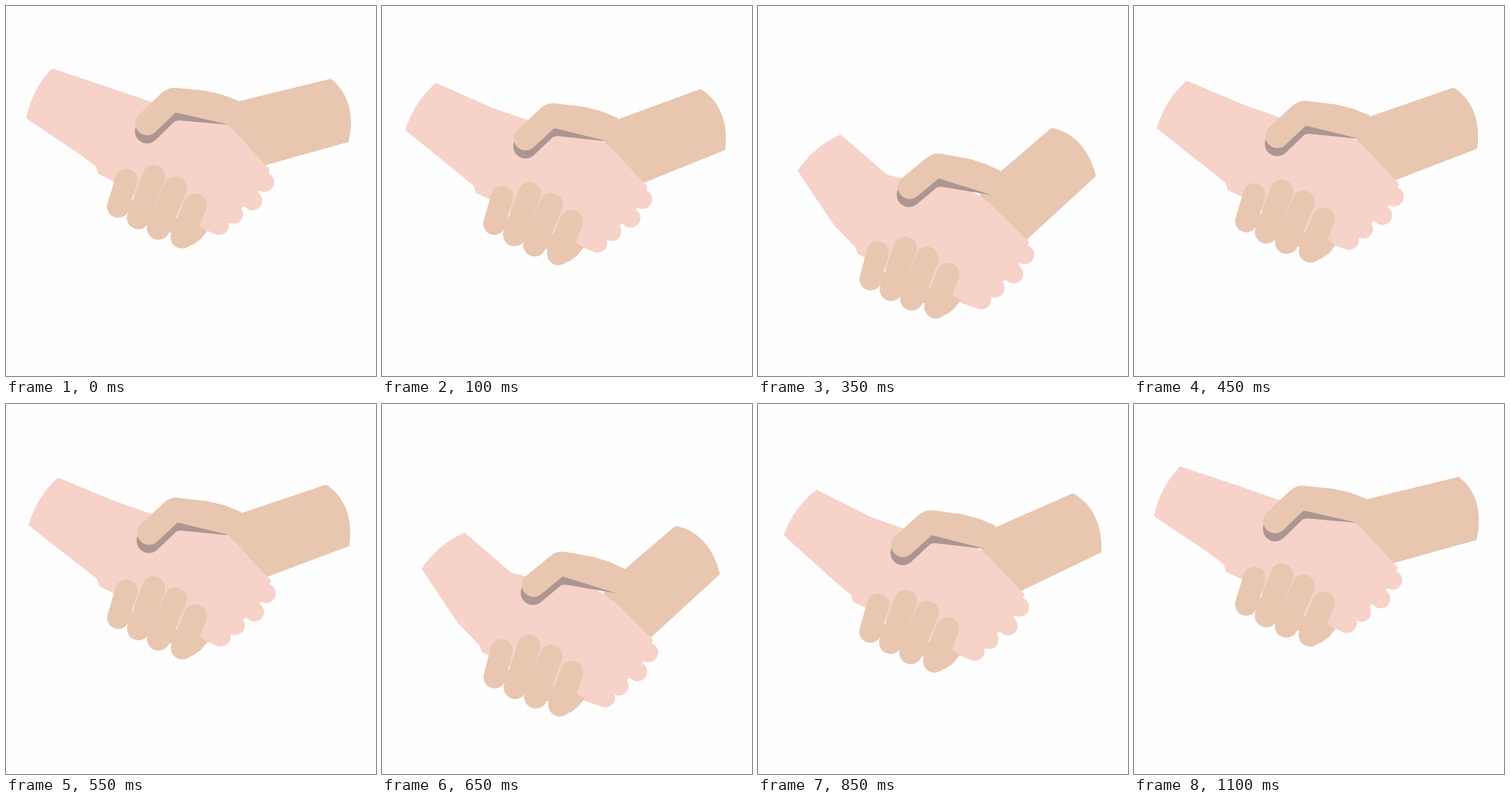
Write an HTML page that moves like this. It is 498 px wide and 498 px high and loops after 2.55 s.

```html
<!DOCTYPE html>
<html lang="en">
<head>
<meta charset="utf-8">
<title>Handshake</title>
<style>
  html, body { margin: 0; width: 100%; height: 100%; overflow: hidden; background: #fefefe; }
  svg { display: block; width: 100%; height: 100%; }
  path { stroke-linecap: round; }
</style>
</head>
<body>
<svg viewBox="0 0 498 498"></svg>
<script>
const LOOP = 2550, STEP = 50;
const PINK = '#f6d2c9', TAN = '#e8c6b0', SHADE = '#ad9691';

// Rigid parts: pivot, then travel and turn (degrees) for one unit of lowering.
const parts = {
  l: { x: 160, y: 180, dx: 5.3, dy: 118.9, turn: 22.3 },  // left forearm
  r: { x: 335, y: 170, dx: 1.6, dy: 104.3, turn: -26.9 }, // right forearm
  p: { x: 240, y: 240, dx: 11, dy: 102.5, turn: -2.75 },  // pink hand
  f: { x: 200, y: 270, dx: 0.6, dy: 95.5, turn: -2.4 },   // tan fingers
  t: { x: 240, y: 150, dx: 14.5, dy: 89.5, turn: 4.6 }    // tan thumb
};

// Every point is written as part letter + x,y in the raised pose.
// A width makes the shape a stroked line with round ends.
const shapes = [
  { color: TAN, d: 'Mr437,98 Cr456,112 r471,140 r461,183 Lr325,221 r296,165 r314,128Z' },
  { color: PINK, d: 'Ml62,84 Ll140,110 p195,129 p270,142 p292,156 p306,167 p355,220 p348,237 ' +
      'p332,262 p306,280 p287,295 p284,308 p262,299 p231,285 p205,268 p172,255 p150,238 ' +
      'p145,236 p124,226 p121,216 l100,200 l64,176 l27,151 Ql35,112 l62,84Z' },
  { color: PINK, width: 26, d: 'Mp348,237h0 Mp332,262h0 Mp306,280h0 Mp287,295h0' },
  { color: TAN, d: 'Mf151,270 Lf172,260 f205,272 f231,286 f258,295 f271,303 f262,314 ' +
      'f252,321 f237,326 f237,311 f205,299 f178,285Z' },
  { color: TAN, width: 30, d: 'Mf162,234 Lf151,270' },
  { color: TAN, width: 31, d: 'Mf199,230 Lf178,285 Mf228,245 Lf205,299 Mf255,268 Lf237,311' },
  { color: SHADE, width: 33, d: 'Mt190,168.5 Lt219,140' },
  { color: SHADE, d: 'Mt226,140 Lt302,160 t233,154 t222,156Z' },
  { color: TAN, width: 32, d: 'Mt190,158 Lt218,131' },
  { color: TAN, d: 'Mt207,119.5 Qt217,109 t228,110 Lt268,114 t290,119 t314,128 t302,160 t231,144 t210,140Z' }
];

// Time, shakes completed, shakes per ms.
const phaseKeys = [
  [0, 0, .0014], [200, .319, .00175], [350, .613, .0023], [550, 1.131, .0027],
  [650, 1.387, .0024], [850, 1.806, .0016], [1100, 2, 0]
];

function phaseAt(time) {
  const next = phaseKeys.findIndex(key => key[0] > time);
  if (next < 0) return 2;
  const [t0, a, slopeA] = phaseKeys[next - 1], [t1, b, slopeB] = phaseKeys[next];
  const span = t1 - t0, s = (time - t0) / span, q = 1 - s;
  return q * q * (1 + 2 * s) * a + s * s * (3 - 2 * s) * b
    + span * s * q * (q * slopeA - s * slopeB);
}

function place(part, x, y, lowered) {
  const angle = part.turn * lowered * Math.PI / 180;
  const cos = Math.cos(angle), sin = Math.sin(angle);
  const rx = x - part.x, ry = y - part.y;
  const px = part.x + part.dx * lowered + rx * cos - ry * sin;
  const py = part.y + part.dy * lowered + rx * sin + ry * cos;
  return `${px.toFixed(2)},${py.toFixed(2)}`;
}

const svg = document.querySelector('svg');
for (const shape of shapes) {
  shape.path = document.createElementNS(svg.namespaceURI, 'path');
  shape.path.setAttribute('fill', shape.width ? 'none' : shape.color);
  if (shape.width) {
    shape.path.setAttribute('stroke', shape.color);
    shape.path.setAttribute('stroke-width', shape.width);
  }
  svg.append(shape.path);
}

function draw(time) {
  const lowered = .57 * (1 - Math.cos(2 * Math.PI * phaseAt(time)));
  for (const { path, d } of shapes) {
    path.setAttribute('d', d.replace(/([lrpft])([\d.]+),([\d.]+)/g,
      (_, part, x, y) => place(parts[part], +x, +y, lowered)));
  }
}

const start = performance.now();
function tick() {
  const time = (performance.now() - start) % LOOP;
  draw(Math.floor(time / STEP) * STEP);
  requestAnimationFrame(tick);
}
tick();
</script>
</body>
</html>
```
